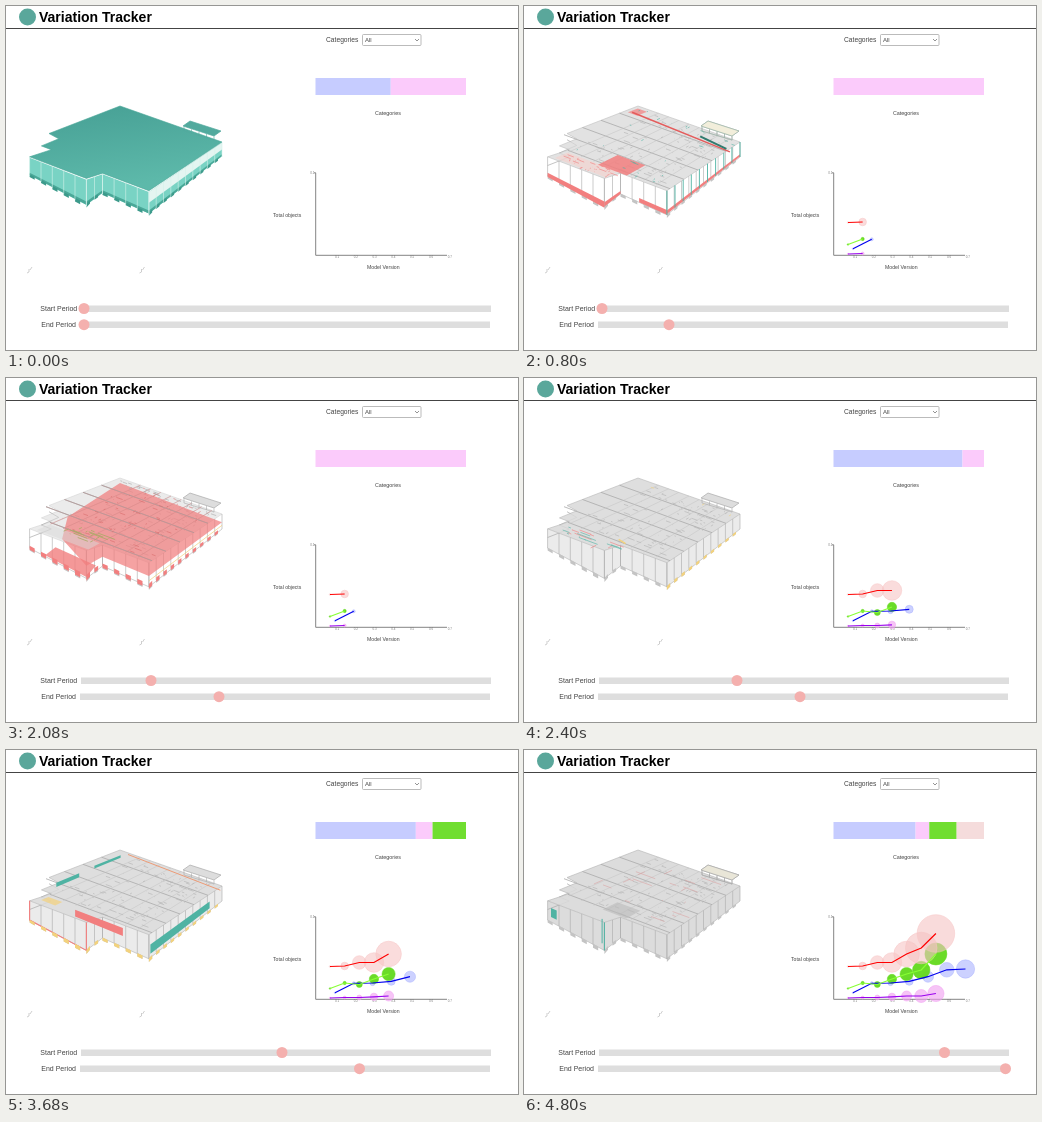
These frames come from a looping animation (512 by 344 pixels, 5600 ms). An HTML page:

```html
<!DOCTYPE html>
<html lang="en">
<head>
<meta charset="utf-8">
<title>Variation Tracker</title>
<style>
  html, body { margin: 0; width: 100%; height: 100%; overflow: hidden; background: #fff; }
  svg { display: block; width: 100vw; height: 100vh; font-family: "Liberation Sans", Arial, sans-serif; fill: #444; }
</style>
</head>
<body>
<svg viewBox="0 0 512 344">
  <linearGradient id="roof" x2=".3" y2="1"><stop stop-color="#469f94"/><stop offset="1" stop-color="#5db9aa"/></linearGradient>
  <circle cx="21.5" cy="11" r="8.5" fill="#5aa79b"/>
  <text x="33" y="16" font-size="14" font-weight="bold" fill="#000">Variation Tracker</text>
  <path d="M0 22.5H512" stroke="#444"/>
  <text x="320" y="36" font-size="6.7">Categories</text>
  <rect x="356.5" y="28.5" width="58.5" height="11" rx="1" fill="#fff" stroke="#aaa" stroke-width=".8"/>
  <text x="359" y="36.2" font-size="6">All</text>
  <path d="M409 33l2 2 2-2" fill="none" stroke="#666" stroke-width=".7"/>
  <text x="382" y="108.5" font-size="5.4" text-anchor="middle">Categories</text>
  <text x="267" y="210.6" font-size="5.1">Total objects</text>
  <text x="361" y="263.2" font-size="5.15">Model Version</text>
  <path d="M308 166.8h1.700V249.300H441" fill="none" stroke="#777" stroke-width=".9"/>
  <g id="ticks" font-size="3" fill="#777" text-anchor="middle"><text x="306.3" y="168">0.1</text></g>
  <path id="triad" d="M21 267l2-1v-3m1 1l2-3" fill="none" stroke="#bbb" stroke-width=".7"/>
  <use href="#triad" x="112.5"/>
  <text x="34.3" y="305.3" font-size="7">Start Period</text>
  <text x="35.3" y="321.3" font-size="7">End Period</text>
  <path d="M75 302.8H485M74 318.8H484" stroke="#dedede" stroke-width="6.5"/>
  <g id="scene"></g>
</svg>
<script>
const STEP = 800;
const RED = '#f27f7f', TEAL = '#4fb3a3', YELLOW = '#f3d27c', GREY = '#aaa', LIGHT = '#d9d9d9';

const knobStops = [78, 145, 213, 276, 353.5, 420.5, 481.5];
const pointCounts = [0, 2, 2, 4, 5, 5, 7];
const shares = ['11', '01', '01', '61', '612', '612', '6122'];   // relative widths in the category bar
const shareFills = ['#c6ccff', '#fbcbfb', '#70de30', '#f5dcdc'];

// Dot radius grows as grow * i ^ power.
const series = [
  { line: '#90e', fill: '#f09cf0', opacity: .6, x: 324, dx: 14.65, grow: .65, power: 1.35, y: [248, 247.5, 247.5, 246.8, 246, 246, 243.5] },
  { line: '#00e', fill: '#aab2ff', opacity: .6, x: 329, dx: 18.75, grow: .68, power: 1.4, y: [242.8, 233.3, 233, 231.3, 226.7, 219.8, 219] },
  { line: '#8f3', fill: '#62d91c', opacity: .95, x: 324, dx: 14.65, grow: .83, power: 1.4, y: [238.5, 233, 234.5, 229, 224, 220, 204] },
  { line: '#f00', fill: '#f6c4c4', opacity: .6, x: 324, dx: 14.65, grow: 3, power: 1, y: [216.5, 216, 212.5, 212.5, 204, 198, 183.5] }
];

const repeat = (n, draw) => Array.from({ length: n }, (_, i) => draw(i)).join('');
const mix = (a, b, t) => a + (b - a) * t;

// Roof plan (u, v) and depth below the roof (h); the front block reaches deeper.
function project([u, v, h = 0]) {
  const x = mix(114 + 102 * u, 3 + 129 * u, v);
  const y = mix(100 + 36 * u, 143 + 49 * u, v);
  const depth = 15 + .16 * (y - 136) + 12 * u * v ** 16;
  return [x, y + h * depth].map(n => n.toFixed(1)).join();
}

const left = [.16, 1], front = [.6, 1], notch = [.63, .87], right = [1, .87], back = [1, 0];
const outline = [[0, 0], back, right, notch, front, left, [.18, .82], [.1, .82], [.1, .66], [0, .64]];
const frontWall = [left, front], sideWall = [front, notch], rightFront = [notch, right], rightWall = [right, back];
const walls = [frontWall, sideWall, rightFront, rightWall];
const bays = [5, 2, 4, 10];
const frontBlock = [.2, .86, .6, .98], mainRoof = [.18, .02, .95, .83], backEdge = [.02, .02, .98, .07];

const at = (points, h) => points.map(([u, v]) => [u, v, h]);
const poly = (points, fill, opacity = 1, stroke = 'none') =>
  `<polygon points="${points.map(project).join(' ')}" fill="${fill}" opacity="${opacity}" stroke="${stroke}" stroke-width=".6"/>`;
const line = (points, color, width = .7) =>
  `<polyline points="${points.map(project).join(' ')}" fill="none" stroke="${color}" stroke-width="${width}"/>`;
const along = ([a, b], t) => [mix(a[0], b[0], t), mix(a[1], b[1], t)];
function panel(wall, h, h2, fill, from = 0, to = 1) {
  const ends = [along(wall, from), along(wall, to)];
  return poly([...at(ends, h), ...at(ends.reverse(), h2)], fill);
}
const patch = ([u, v, u2, v2], fill, opacity, h = 0) =>
  poly(at([[u, v], [u2, v], [u2, v2], [u, v2]], h), fill, opacity);
const bandRound = (h, h2, fill) => walls.map(w => panel(w, h, h2, fill)).join('');
const posts = (wall, n, color, width = .6) =>
  repeat(n + 1, i => { const p = along(wall, i / n); return line([[...p, 0], [...p, 1]], color, width); });
const allPosts = color => walls.map((w, i) => posts(w, bays[i], color)).join('');
const feet = (wall, fill, h = .98, h2 = 1.13) => {
  const n = bays[walls.indexOf(wall)];
  return repeat(n, i => panel(wall, h, h2, fill, i / n, (i + .45) / n));
};
const allFeet = (fill, h, h2) => walls.map(w => feet(w, fill, h, h2)).join('');

// Short strokes along either plan axis, spread over an area.
function scatter([u, v, u2, v2], count, color, length = .06, width = .6) {
  let seed = count * 7;
  const random = () => (seed = seed * 16807 % 2147483647) / 2147483647;
  random();
  return repeat(count, () => {
    const a = mix(u, u2, random()), b = mix(v, v2, random()), d = length * random();
    return line([[a, b], random() < .6 ? [Math.min(a + d, 1), b] : [a, b + d / 2]], color, width);
  });
}

const grid = (across, down) =>
  repeat(5, i => line([[i < 4 ? 0 : .18, (i + 1) / 6], [1, (i + 1) / 6]], across, .8))
  + repeat(8, i => line([[.2 + i / 10, 0], [.2 + i / 10, .85]], down, .5));

const platform = (fill, stroke) =>
  `<path d="M177 120l7-5 31 10-7 5z" fill="${fill}" stroke="${stroke}" stroke-width=".7"/>
   <path d="M178 125l30 9" stroke="${stroke}" stroke-width=".6"/>`
  + repeat(5, i => `<path d="M${178 + i * 7.5} ${121 + i * 2.3}v4" stroke="${stroke}" stroke-width=".6"/>`);

const greyModel = (roofOpacity = .85, wallFill = 'rgba(216,216,216,.5)') =>
  bandRound(0, 1, wallFill)
  + line(at(outline.slice(5), .45), GREY)
  + line(at([left, front, notch, right, back], 1), '#bbb')
  + allFeet('#c4c4c4') + allPosts(GREY)
  + poly(outline, LIGHT, roofOpacity, GREY)
  + grid('#aaa', '#c2c2c2') + scatter(mainRoof, 110, '#b2b2b2')
  + platform('#ddd', GREY);

const views = [
  () => bandRound(.05, .95, '#79d3c4') + panel(rightWall, .05, .5, '#e4f5f1')
    + bandRound(.82, .94, '#4aa898') + allFeet('#3c9a8b', .9, 1.04) + allPosts('#d5f1eb')
    + poly(outline, 'url(#roof)', 1, '#48a797')
    + platform('#52aa9e', '#52aa9e'),

  () => greyModel(.75, 'none')
    + patch(frontBlock, '#f8cfcb', .55) + scatter(frontBlock, 30, RED)
    + patch([.45, .67, .68, .87], RED, .85) + patch([.03, .03, .12, .12], RED, .7)
    + panel(frontWall, .82, 1.05, RED) + panel(sideWall, .85, 1, RED)
    + panel(rightFront, .8, 1, RED, .4) + panel(rightWall, .82, .97, RED)
    + posts(rightWall, 9, TEAL, .9)
    + line([[.05, .1], [1, .12, .2]], '#e45c5c', 1.5)
    + line([[.7, .1], [.95, .1, .2]], '#317b70', 2)
    + scatter(mainRoof, 16, TEAL) + scatter(backEdge, 12, TEAL)
    + platform('#f2eedb', '#9bb8a9'),

  () => greyModel(.5, 'none')
    + poly(at(outline.slice(0, 5).concat([[.3, .86], [.12, .6]]), .55), RED, .72)
    + patch([.28, .9, .6, 1], RED, .8, .95)
    + patch(frontBlock, LIGHT, .5)
    + grid('#b59a9a', '#d98a8a') + scatter(mainRoof, 70, '#d96c6c')
    + allFeet(RED, .88, 1.08) + line(at(rightWall, .75), YELLOW)
    + scatter([.3, .74, .55, .9], 18, '#a9aa65', .15, .8) + scatter(backEdge, 25, GREY),

  () => greyModel()
    + scatter(frontBlock, 9, RED, .15) + scatter(frontBlock, 10, TEAL, .15)
    + line(at([[.57, .81], [.64, .83]], 0), YELLOW, 1.5)
    + feet(rightWall, YELLOW) + scatter(backEdge, 4, YELLOW),

  () => greyModel()
    + panel([[.42, .88], [.8, .88]], .1, .45, RED)
    + panel(rightWall, .45, .85, TEAL, .02, .83)
    + panel([[.08, .66], [.08, .45]], .05, .35, TEAL) + panel([[.07, .3], [.07, .06]], 0, .25, TEAL)
    + line([left, [...left, 1], [...front, 1], front], RED, 1.1)
    + line([[.1, .02], [1, .02, .2]], '#ed9b76', 1)
    + patch([.2, .87, .31, .94], YELLOW, .7)
    + allFeet(YELLOW),

  () => greyModel()
    + patch([.48, .71, .67, .86], '#b2b2b2', .75)
    + panel([left, [.24, .79]], .15, .5, '#e9745f')
    + panel(frontWall, .85, 1.05, '#ee7567')
    + line([[.44, .91], [.66, .88, .5]], TEAL, 1.2)
    + feet(rightWall, RED),

  () => greyModel(.9, '#dcdcdc')
    + patch([.48, .71, .67, .86], '#bbb', .6)
    + scatter(mainRoof, 20, '#dba4a4', .2)
    + panel(frontWall, .3, .75, TEAL, .06, .16) + posts([[.56, .97], front], 1, TEAL, 1)
    + platform('#e9e6d8', GREY)
];

function categoryBar(state) {
  const weights = [...shares[state]].map(Number);
  const unit = 150.5 / weights.reduce((a, b) => a + b);
  let x = 309.5;
  return weights.map((w, i) => {
    x += w * unit;
    return `<rect x="${x - w * unit}" y="72" width="${w * unit}" height="17" fill="${shareFills[i]}"/>`;
  }).join('');
}

function chart(count) {
  const plotted = series.map(s => ({ ...s, points: s.y.slice(0, count).map((y, i) => [s.x + i * s.dx, y]) }));
  const dots = plotted.flatMap(s => s.points.map(([x, y], i) =>
    `<circle cx="${x}" cy="${y}" r="${.8 + s.grow * i ** s.power}" fill="${s.fill}" fill-opacity="${s.opacity}" stroke="${s.fill}" stroke-width=".5"/>`));
  const lines = plotted.map(s => `<polyline points="${s.points.join(' ')}" fill="none" stroke="${s.line}" stroke-width="1.2"/>`);
  return [...dots, ...lines].join('');
}

const knob = (stop, y) => `<circle cx="${knobStops[Math.max(stop, 0)]}" cy="${y}" r="5.5" fill="#f4b0ae"/>`;
const scene = document.getElementById('scene');
document.getElementById('ticks').innerHTML += repeat(7, i => `<text x="${331 + i * 18.8}" y="252.3">0.${i + 1}</text>`);

let shown = -1;
function render() {
  const state = Math.floor(performance.now() / STEP) % views.length;
  if (state !== shown) {
    shown = state;
    scene.innerHTML = views[state]() + categoryBar(state) + chart(pointCounts[state])
      + knob(state - 1, 302.5) + knob(state, 318.7);
  }
  requestAnimationFrame(render);
}
render();
</script>
</body>
</html>
```
